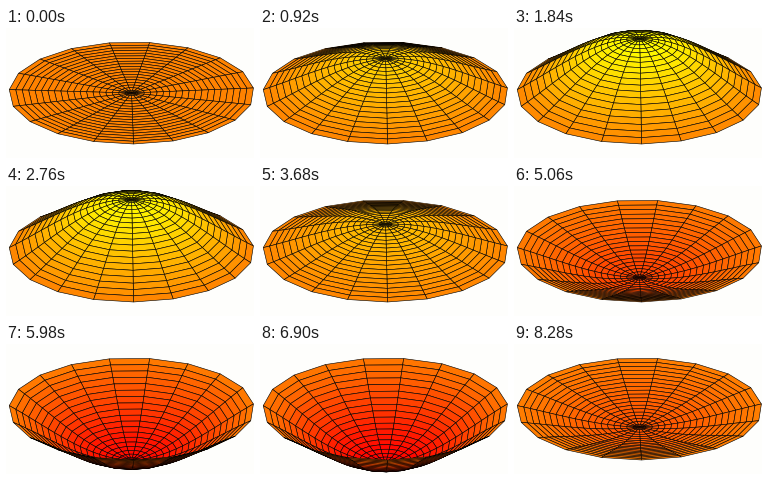
Recreate the animation shown at these times as a matplotlib script. Size 248x130 px, loop 8740 ms.

```python
import numpy as np
import matplotlib.pyplot as plt
from matplotlib.animation import FuncAnimation
from matplotlib.collections import PolyCollection

WIDTH, HEIGHT, DPI = 248, 130, 100
FRAMES, INTERVAL = 19, 460
SECTORS, RINGS = 19, 19
CENTER_X, CENTER_Y = 125.5, 65
RADIUS_X, RADIUS_Y, LIFT = 122.5, 51, 56
AZIMUTH = np.radians(18)
ROOT = 2.404826  # first zero of J0
PAPER = "#fefefc"


def bessel_j0(x):
    s = np.linspace(0, np.pi, 200, endpoint=False) + np.pi / 400
    return np.cos(np.multiply.outer(x, np.sin(s))).mean(axis=-1)


radius = np.linspace(0, 1, RINGS + 1)
angle = np.linspace(0, 2 * np.pi, SECTORS + 1) - AZIMUTH
R, T = np.meshgrid(radius, angle)
SHAPE = bessel_j0(ROOT * R)
SCREEN_X = CENTER_X + RADIUS_X * R * np.sin(T)
NEAR = R * np.cos(T)


def cells(grid):
    """Four corner values of every mesh cell."""
    corners = grid[:-1, :-1], grid[:-1, 1:], grid[1:, 1:], grid[1:, :-1]
    return np.stack([c.ravel() for c in corners], axis=1)


fig = plt.figure(figsize=(WIDTH / DPI, HEIGHT / DPI), dpi=DPI, facecolor=PAPER)
ax = fig.add_axes([0, 0, 1, 1])
ax.set(xlim=(0, WIDTH), ylim=(HEIGHT, 0))
ax.axis("off")
membrane = PolyCollection([], edgecolors="black", linewidths=0.42,
                          antialiaseds=True, joinstyle="bevel")
ax.add_collection(membrane)
autumn = plt.get_cmap("autumn", 64)


def update(frame):
    height = np.sin(2 * np.pi * frame / FRAMES) * SHAPE
    screen_y = CENTER_Y + RADIUS_Y * NEAR - LIFT * height
    quads = np.stack([cells(SCREEN_X), cells(screen_y)], axis=2)
    depth = cells(0.9 * NEAR + 0.2 * height).mean(axis=1)
    order = np.argsort(depth)
    shade = cells(height)[:, 0]
    membrane.set_verts(quads[order])
    membrane.set_facecolor(autumn((shade[order] + 1) / 2))
    return [membrane]


anim = FuncAnimation(fig, update, frames=FRAMES, interval=INTERVAL,
                     repeat=True, repeat_delay=0)
plt.show()
```
